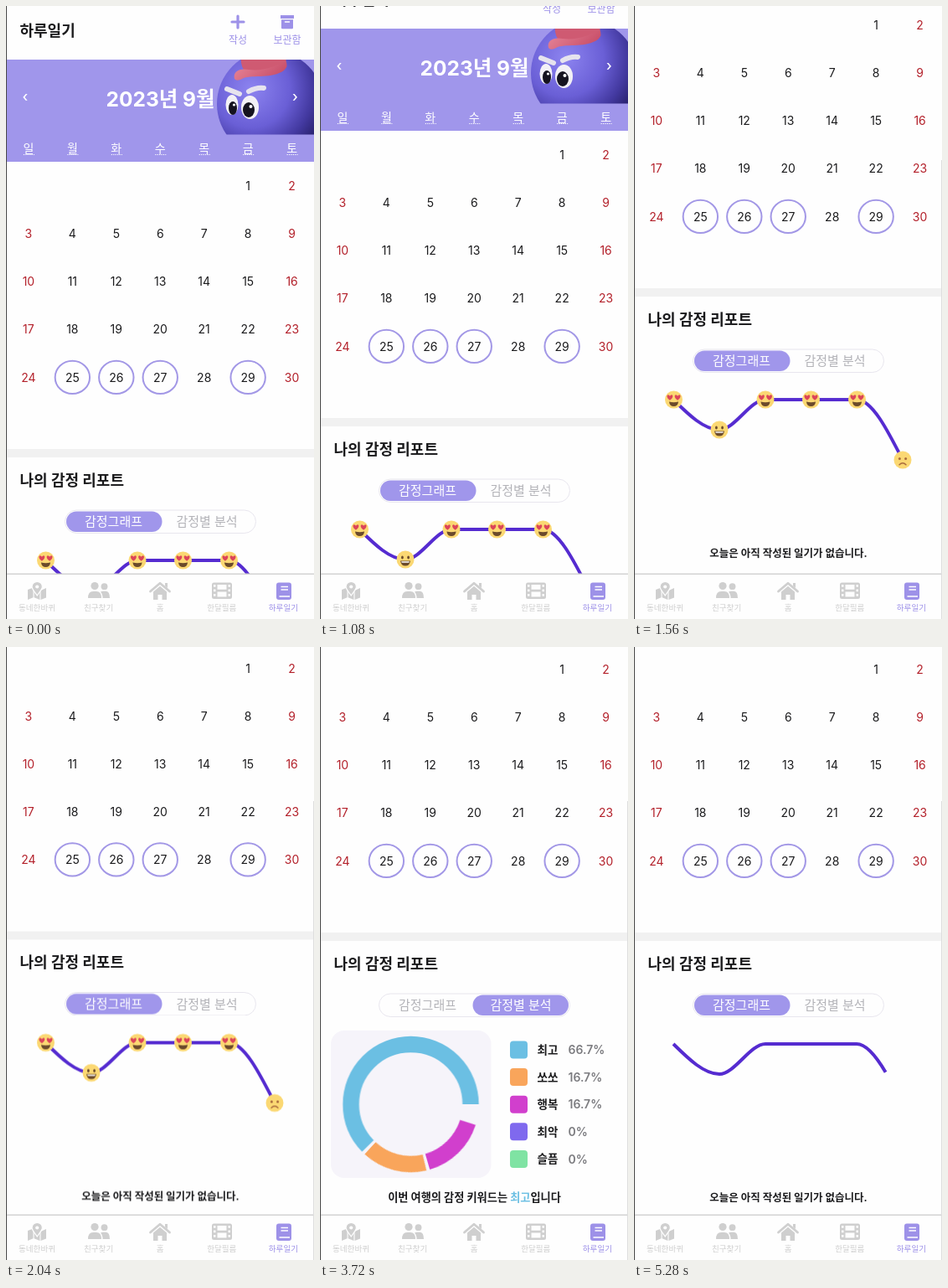
An HTML page for the animation above (5400 ms loop, 368x732 px).

```html
<!DOCTYPE html>
<html lang="ko">
<head>
<meta charset="utf-8">
<title>하루일기</title>
<style>
html, body { margin: 0; width: 100%; height: 100%; overflow: hidden; background: #fefefe; }
svg { display: block; width: 368px; height: 732px; font-family: Inter, "Noto Sans CJK KR", "Noto Sans CJK", sans-serif; }
text { white-space: pre; }

#page { animation: scroll 5400ms linear both; }
@keyframes scroll {
  0%, 15.56% { transform: translateY(0); }
  17.78% { transform: translateY(-3px); }
  20% { transform: translateY(-37px); }
  24.44% { transform: translateY(-120px); }
  28.89% { transform: translateY(-192px); }
  31.11% { transform: translateY(-195px); }
  35.56% { transform: translateY(-191px); }
  40%, 100% { transform: translateY(-188px); }
}

/* tab panels swap hard */
#graph { animation: graph 5400ms step-end both; }
#share { animation: share 5400ms step-end both; }
#faces { animation: faces 5400ms step-end both; }
#edge { animation: edge 5400ms step-end both; }
@keyframes graph { 0% { opacity: 1; } 44.2% { opacity: 0; } 83.3%, 100% { opacity: 1; } }
@keyframes share { 0% { opacity: 0; } 44.2% { opacity: 1; } 83.3%, 100% { opacity: 0; } }
@keyframes faces { 0% { opacity: 1; } 44.2%, 100% { opacity: 0; } }
@keyframes edge { 0% { opacity: 0; } 24.4%, 100% { opacity: 1; } }

#line { fill: none; stroke: #552bd0; stroke-width: 4; stroke-dasharray: 1 2; animation: draw 1344ms ease 4500ms; }
@keyframes draw { from { stroke-dasharray: 0 2; } }

.arc {
  fill: none; stroke-width: 19.5; stroke-dasharray: var(--len) 360;
  transform: rotate(var(--to)); animation: sweep 1344ms ease 2721ms both;
}
@keyframes sweep { from { stroke-dasharray: 0 360; transform: rotate(var(--from)); } }
</style>
</head>
<body>
<svg viewBox="0 0 368 732">
  <defs>
    <radialGradient id="ball" cx=".32" cy=".36" r=".72">
      <stop offset="0" stop-color="#8d84f0"/>
      <stop offset=".5" stop-color="#6a5fd6"/>
      <stop offset=".8" stop-color="#4339a0"/>
      <stop offset="1" stop-color="#2a2270"/>
    </radialGradient>
    <linearGradient id="cap" x2="1" y2=".4">
      <stop offset="0" stop-color="#e8899c"/>
      <stop offset="1" stop-color="#c9506a"/>
    </linearGradient>
    <clipPath id="crop"><path d="M248 64h120v89.5H248z"/></clipPath>
    <g id="head"><circle r="10.5" fill="#fbd873"/></g>
    <path id="heart" d="M0 3.6C-5 .2-3.6-3.4-1.6-2.8Q-.4-2.6 0-1.4Q.4-2.6 1.6-2.8C3.6-3.4 5 .2 0 3.6z" fill="#dc4459"/>
    <g id="love">
      <use href="#head"/>
      <use href="#heart" x="-4.6" y="-2.8"/><use href="#heart" x="4.6" y="-2.8"/>
      <path d="M-5.6 2.4Q0 4 5.6 2.4Q4.8 8 0 8T-5.6 2.4z" fill="#6b4a2b"/>
    </g>
    <g id="grin">
      <use href="#head"/>
      <ellipse cx="-3.6" cy="-2.6" rx="1.4" ry="2" fill="#6b4a2b"/>
      <ellipse cx="3.6" cy="-2.6" rx="1.4" ry="2" fill="#6b4a2b"/>
      <path d="M-6 1.4H6Q5 7.6 0 7.6T-6 1.4z" fill="#6b4a2b"/>
      <path d="M-4.8 2.2H4.8L4.3 3.8H-4.3z" fill="#fff"/>
    </g>
    <g id="sad">
      <use href="#head"/>
      <circle cx="-3.6" cy="-1.6" r="1.5" fill="#a8693c"/><circle cx="3.6" cy="-1.6" r="1.5" fill="#a8693c"/>
      <path d="M-4 5.8Q0 1.6 4 5.8" fill="none" stroke="#a8693c" stroke-width="1.4" stroke-linecap="round"/>
    </g>
  </defs>

  <path d="M0 0h368v732H0z" fill="#fefefe"/>

  <g id="page">
    <path d="M277 12v14M270 19h14" stroke="#9d91e8" stroke-width="3.2" stroke-linecap="round"/>
    <path d="M328 11h16v4h-16zM329 16.2h14V26q0 1.2-1.2 1.2h-11.6q-1.2 0-1.2-1.2z" fill="#9d91e8"/>
    <path d="M333.5 19h5" stroke="#fff" stroke-width="1.5" stroke-linecap="round"/>
    <path d="M0 64h368v122H0z" fill="#a096eb"/>

    <g clip-path="url(#crop)">
      <circle cx="316" cy="117" r="64" fill="url(#ball)"/>
      <path d="M281 60C280 68 282 74 286 79Q312 88 334 71L335 60z" fill="#cf5a72"/>
      <path d="M273 87C271 78 279 74 290 76C306 78 322 73 334 65Q338 72 332 77C318 87 296 82 284 86Q276 91 273 87z" fill="url(#cap)"/>
      <ellipse cx="270" cy="118" rx="7.5" ry="12" fill="#f3f1f6"/>
      <ellipse cx="291.5" cy="121" rx="10.5" ry="14" fill="#f3f1f6"/>
      <ellipse cx="271" cy="122" rx="5" ry="8" fill="#15131f"/>
      <ellipse cx="290" cy="124" rx="7" ry="9" fill="#15131f"/>
      <circle cx="272.5" cy="118" r="1.6" fill="#fff"/><circle cx="292.5" cy="120" r="2" fill="#fff"/>
      <path d="M264 99L279 105M290 102Q299 97 308 98" fill="none" stroke="#e6e3ee" stroke-width="6" stroke-linecap="round"/>
    </g>
    <g id="calendar"></g>
    <path d="M0 529h368v10H0z" fill="#f1f1f1"/>
    <g id="report"></g>

    <g id="graph">
      <rect x="72" y="603.5" width="114.5" height="24.5" rx="12.2" fill="#a096eb"/>
      <path id="line" pathLength="1" d="M47 662C65.3 680 83.7 698 102 698S138.7 662 157 662H266C284.3 662 302.7 698 321 734"/>
      <g id="faces">
        <use href="#love" x="47.5" y="662"/><use href="#grin" x="102" y="698"/>
        <use href="#love" x="157" y="662"/><use href="#love" x="211.5" y="662"/>
        <use href="#love" x="266.5" y="662"/><use href="#sad" x="321" y="734"/>
      </g>
    </g>

    <g id="share">
      <rect x="182.5" y="603.5" width="114.5" height="24.5" rx="12.2" fill="#a096eb"/>
      <rect x="13" y="646" width="191.5" height="176" rx="16" fill="#f6f4fa"/>
      <g transform="translate(108.5 734) scale(1 -1)">
        <circle class="arc" r="71.5" pathLength="360" stroke="#6bbfe3" style="--len:234;--from:0deg;--to:0deg"/>
        <circle class="arc" r="71.5" pathLength="360" stroke="#f9a55b" style="--len:58.5;--from:3deg;--to:237deg"/>
        <circle class="arc" r="71.5" pathLength="360" stroke="#d13fcd" style="--len:58.5;--from:6deg;--to:298.5deg"/>
      </g>
    </g>
  </g>

  <g id="nav" fill="#cfcfcf">
    <path d="M0 678h368v54H0z" fill="#fefefe"/>
    <path d="M0 677.5h368v1.5H0z" fill="#d2d2d2"/>
    <path d="M26 697l6.5-2.6v11.8L26 709zM33.6 695l6.8 3v11l-6.8-2.8zM41.5 698l6.5-3v11.4l-6.5 2.6z"/>
    <path d="M37.2 704C33 698 31 696 31 693.500a6.200 6.200 0 0 1 12.400 0C43.400 696 41.400 698 37.200 704z" stroke="#fefefe" stroke-width="1.200"/>
    <circle cx="37.2" cy="693.5" r="2.1" fill="#fefefe"/>
    <circle cx="106" cy="692.5" r="4.6"/><circle cx="117.500" cy="693.200" r="3.900"/>
    <path d="M98 707q0-8 6-8h4q6 0 6 8zM115.500 707q0-5-2.500-7.500q1.500-.8 3-.8h3q5 0 5 8.300z"/>
    <path d="M172.500 699L184 689.300L195.500 699" fill="none" stroke="#cfcfcf" stroke-width="2.800" stroke-linecap="round" stroke-linejoin="round"/>
    <path d="M190 689h3v6l-3-2.500zM176 699.500l8-6.700 8 6.700V709h-5.500v-6h-5v6H176z"/>
    <rect x="246" y="688.5" width="24" height="19.5" rx="2.5"/>
    <path d="M252.500 691h11v5.800h-11zM252.500 699.500h11v6h-11zM248 691h2.500v2.800H248zM248 696.500h2.500v2.800H248zM248 702h2.500v2.800H248zM265.500 691h2.500v2.800h-2.500zM265.500 696.500h2.500v2.800h-2.500zM265.500 702h2.500v2.800h-2.500z" fill="#fefefe"/>
    <rect x="323" y="688.5" width="18" height="20.5" rx="3" fill="#9d91e8"/>
    <path d="M328.500 693.500h8.500M328.500 697h8.500M326.500 705h12.500" stroke="#fefefe" stroke-width="1.600"/>
  </g>

  <path d="M0 0h1v732H0z" fill="#4a4a4a"/>
  <path id="edge" d="M367 184h1v548h-1z" fill="#dedede"/>
</svg>

<script>
const LOOP = 5400, STEP = 120;
const PURPLE = '#9d91e8', INK = '#1b1b1d', RED = '#b3202a';
const $ = id => document.getElementById(id);
const add = (id, markup) => $(id).insertAdjacentHTML('beforeend', markup);

// y is the vertical middle of the glyphs
const text = (str, x, y, size, fill, weight = 400, anchor = 'middle') =>
  `<text x="${x}" y="${y + size * 0.37}" font-size="${size}" fill="${fill}" font-weight="${weight}" text-anchor="${anchor}">${str}</text>`;
const colX = i => 26.9 + 52.45 * i;

add('calendar',
  text('하루일기', 16.5, 29, 18, INK, 700, 'start') +
  text('작성', 277, 41, 12, PURPLE) +
  text('보관함', 336, 41, 12, PURPLE) +
  text('2023년 9월', 184.5, 111, 24.5, '#fff', 700) +
  text('‹', 23, 108, 17, '#fff', 500) +
  text('›', 345.5, 108, 17, '#fff', 500));

[...'일월화수목금토'].forEach((name, i) => add('calendar',
  text(name, colX(i), 170, 14, '#fff') +
  `<path d="M${colX(i) - 6} 177.5h13" stroke="#fff" stroke-dasharray="1.200 1.200"/>`));

for (let day = 1; day <= 30; day++) {
  const cell = day + 4, col = cell % 7;
  const x = colX(col), y = 215 + 57.1 * Math.floor(cell / 7);
  if ([25, 26, 27, 29].includes(day))
    add('calendar', `<ellipse cx="${x}" cy="${y}" rx="20.7" ry="19.7" fill="none" stroke="#a297e6" stroke-width="2"/>`);
  add('calendar', text(day, x, y, 14, col % 6 ? INK : RED));
}

const tabs = (a, b) => text('감정그래프', 128.5, 615.5, 15, a) + text('감정별 분석', 240, 615.5, 15, b);

add('report',
  text('나의 감정 리포트', 16.5, 566, 18, INK, 700, 'start') +
  '<rect x="70.5" y="602" width="228" height="27.500" rx="13.700" fill="#fefefe" stroke="#e8e6ee"/>' +
  tabs('#b3b3b8', '#b3b3b8'));

add('graph', text('감정그래프', 128.5, 615.5, 15, '#fff') +
  text('오늘은 아직 작성된 일기가 없습니다.', 184.5, 845, 12.5, INK, 700));

add('share', text('감정별 분석', 240, 615.5, 15, '#fff') +
  text('이번 여행의 감정 키워드는 <tspan fill="#6bbfe3">최고</tspan>입니다', 184.5, 845, 13.2, INK, 700));

[['최고', '66.7%', '#6bbfe3'], ['쏘쏘', '16.7%', '#f9a55b'], ['행복', '16.7%', '#d13fcd'],
 ['최악', '0%', '#7f69ee'], ['슬픔', '0%', '#7fe3a3']].forEach(([name, pct, color], i) => {
  const y = 669 + 32.6 * i;
  add('share',
    `<rect x="227" y="${y - 10.5}" width="21" height="21" rx="4" fill="${color}"/>` +
    text(name, 259.5, y, 13.5, INK, 700, 'start') +
    text(pct, 296.5, y, 14, '#7b7b7f', 600, 'start'));
});

['동네한바퀴', '친구찾기', '홈', '한달필름', '하루일기'].forEach((name, i) =>
  add('nav', text(name, 37 + 73.6 * i, 718, 9.6, i === 4 ? PURPLE : '#cfcfcf')));

const anims = document.getAnimations();
anims.forEach(a => a.pause());
function tick() {
  const t = Math.floor((performance.now() + 4) % LOOP / STEP) * STEP;
  anims.forEach(a => { a.currentTime = t; });
  requestAnimationFrame(tick);
}
tick();
</script>
</body>
</html>
```
